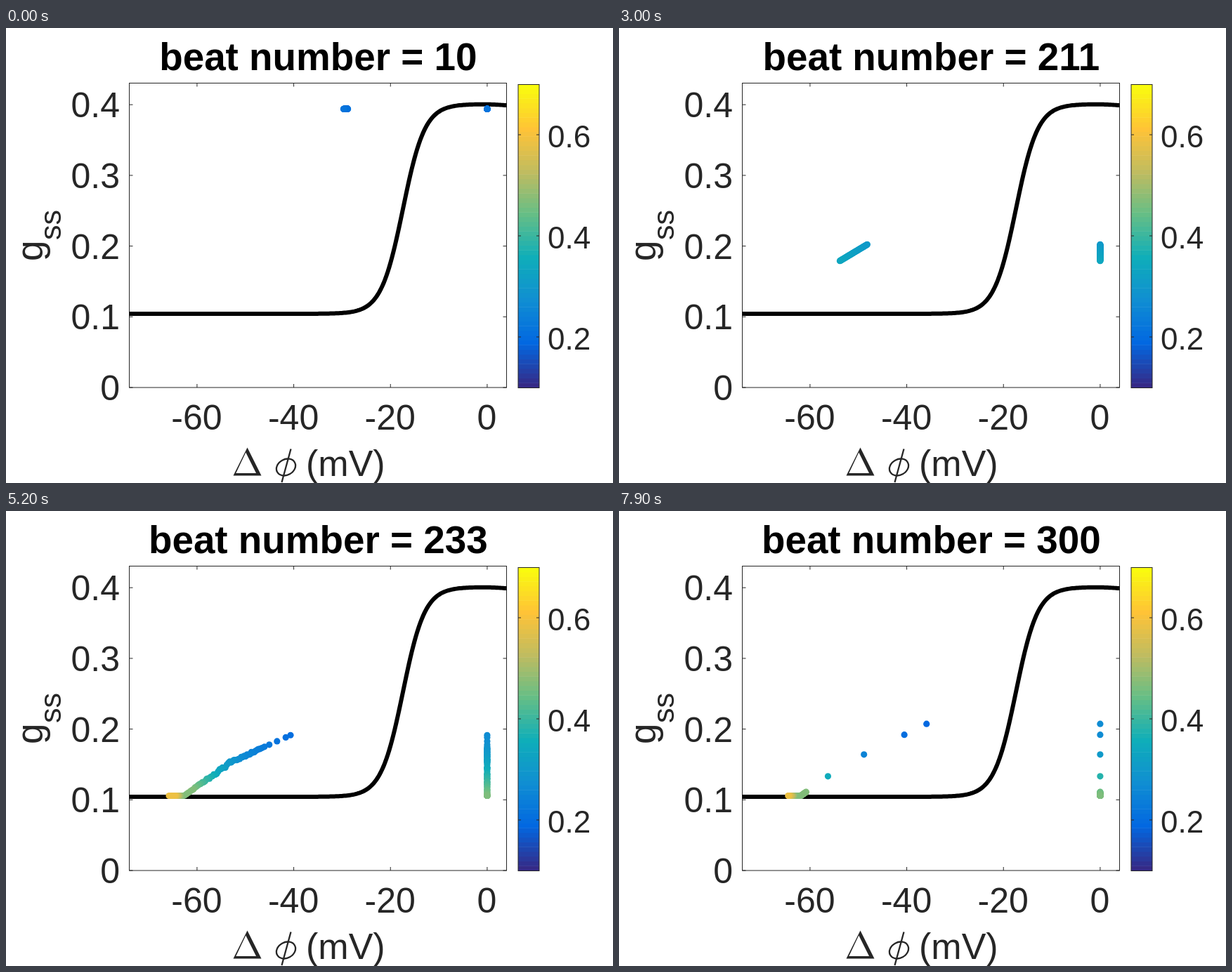
These frames come from a looping animation (864x648 px, 8 s). An HTML page with a canvas:

```html
<!DOCTYPE html>
<html lang="en">
<head>
<meta charset="utf-8">
<title>Beat number</title>
<style>
html, body { margin: 0; width: 100%; height: 100%; overflow: hidden; background: #fff; }
canvas { display: block; }
</style>
</head>
<body>
<canvas id="stage" width="864" height="648"></canvas>
<script>
const ctx = document.getElementById('stage').getContext('2d');
const LOOP = 8000, STEP = 100, CELLS = 70;
const BOX = { l: 175.5, t: 78.5, r: 712.5, b: 512 };
const BAR = { l: 729, t: 80, r: 759, b: 512 };
const INK = '#262626';
const SANS = '"Liberation Sans", Arial, sans-serif';
const MAP = ['352a87', '0268e1', '108ed2', '0faeb9', '65be86', 'c0bc60', 'ffc337', 'f9fb0e'];

const px = mv => 684.9 + mv * 6.883;
const py = g => 512 - g * 1007;
const barY = v => 512 - (v - 0.1) * 720;
const clamp = v => Math.min(1, Math.max(0, v));
const mix = (a, b, k) => a + (b - a) * k;
const noise = n => {
  const s = Math.sin(n * 12.9898) * 43758.5453;
  return s - Math.floor(s) - 0.5;
};

function shade(k) {
  const p = k * (MAP.length - 1), i = Math.min(MAP.length - 2, Math.floor(p));
  const part = c => Math.round(mix(parseInt(MAP[i].substr(c, 2), 16), parseInt(MAP[i + 1].substr(c, 2), 16), p - i));
  return `rgb(${part(0)},${part(2)},${part(4)})`;
}
const colorOf = v => shade(clamp((v - 0.1) / 0.6));

// The beat counter jumps by ten, then by one, then by five.
function beatAt(n) {
  if (n <= 19) return 10 + 10 * n;
  return n <= 69 ? 181 + n : 250 + 5 * (n - 69);
}

// Tight cluster of cells sinking together, widening as it goes.
function cluster(beat) {
  const level = py(0.4 - 0.0006 * beat - 0.049 * (beat / 190) ** 5);
  const right = 486 - 0.65 * (level - 116);
  const width = 6 + 33 * Math.exp((beat - 211) / 12);
  return { level, right, width, slope: -0.6 * beat / 211 };
}

// Cells run from right to left. The cluster fans out, then cells drift
// away from an unstable point until the left ones reach their floor.
function cellX(beat, rank, c) {
  const u = rank / (CELLS - 1);
  const fan = mix(374, 232, u) + 31 * Math.exp(-rank * rank / 6);
  if (beat < 241) return mix(c.right - c.width * u, fan, clamp((beat - 211) / 11));
  const age = beat - 241;
  const floor = 268 - (36 - 0.15 * age) * u;
  return Math.max(floor, 396 + (fan - 396) * Math.exp(0.026 * age));
}

function cellY(beat, rank, x, c) {
  const early = c.level + c.slope * (x - c.right + c.width / 2);
  const unsettled = clamp((241 - beat) / 15);
  const lx = x + 10 * unsettled * clamp((403 - x) / 60);
  const rise = Math.max(0, Math.min(0.72 * (lx - 259), 0.49 * (lx - 229)));
  const rough = 8 * unsettled * clamp((x - 255) / 40) * clamp((375 - x) / 40);
  const late = 405.5 - rise + rough * noise(rank);
  return Math.min(405.5, mix(early, late, clamp((beat - 212) / 10)));
}

const earlyV = x => 0.21 + 0.0005 * (485 - x) + 1.4e-6 * (485 - x) ** 2;
const lateV = x => Math.min(0.47, 0.17 + 0.26 * Math.exp((275 - x) / 60)) + 0.12 * clamp((250 - x) / 9);
const restV = y => 0.268 + 0.2 * (Math.max(0, y - 320) / 86) ** 1.5;

function dot(x, y, v) {
  ctx.fillStyle = colorOf(v);
  ctx.beginPath();
  ctx.arc(x, y, 4.6, 0, 7);
  ctx.fill();
}

function drawCells(beat) {
  const c = cluster(beat);
  const settled = clamp((beat - 211) / 13);
  for (let r = 0; r < CELLS; r++) {
    const x = cellX(beat, r, c), y = cellY(beat, r, x, c);
    dot(x, y, mix(earlyV(x), lateV(x), settled));
    dot(px(0), y, mix(earlyV(x), restV(y), settled));
  }
}

function text(str, x, y, size, align = 'center', weight = '') {
  ctx.font = `${weight} ${size}px ${SANS}`;
  ctx.textAlign = align;
  ctx.fillText(str, x, y);
}

function line(x0, y0, x1, y1) {
  ctx.beginPath();
  ctx.moveTo(x0, y0);
  ctx.lineTo(x1, y1);
  ctx.stroke();
}

function drawCurve() {
  ctx.save();
  ctx.beginPath();
  ctx.rect(BOX.l, BOX.t, BOX.r - BOX.l, BOX.b - BOX.t);
  ctx.clip();
  ctx.beginPath();
  for (let x = BOX.l - 4; x <= BOX.r + 4; x += 2) {
    const s = 1 / (1 + Math.exp((565 - x) / 15.6));
    const dip = 1.7 * (Math.max(0, x - 672) / 40) ** 2;
    ctx.lineTo(x, 407 - 298.6 * s + dip);
  }
  ctx.strokeStyle = '#000';
  ctx.lineWidth = 6;
  ctx.stroke();
  ctx.restore();
}

function drawAxes() {
  ctx.strokeStyle = ctx.fillStyle = INK;
  ctx.lineWidth = 1;
  ctx.strokeRect(BOX.l, BOX.t, BOX.r - BOX.l, BOX.b - BOX.t);
  for (let mv = -60; mv <= 0; mv += 20) {
    const x = px(mv);
    line(x, BOX.b, x, BOX.b - 5);
    line(x, BOX.t, x, BOX.t + 5);
    text(mv, x - 0.5, 572, 50);
  }
  for (let i = 0; i <= 4; i++) {
    const y = py(i / 10);
    line(BOX.l, y, BOX.l + 5, y);
    line(BOX.r, y, BOX.r - 5, y);
    text(i / 10, 162, y + 18, 50, 'right');
  }
}

function drawBar() {
  const h = (BAR.b - BAR.t) / 64;
  for (let i = 0; i < 64; i++) {
    ctx.fillStyle = shade(i / 63);
    ctx.fillRect(BAR.l, BAR.b - (i + 1) * h, BAR.r - BAR.l, h + 0.5);
  }
  ctx.strokeStyle = ctx.fillStyle = INK;
  ctx.lineWidth = 1;
  ctx.strokeRect(BAR.l, BAR.t + 0.5, BAR.r - BAR.l, BAR.b - BAR.t);
  for (const v of [0.2, 0.4, 0.6]) {
    const y = barY(v);
    line(BAR.r, y, BAR.r - 4, y);
    line(BAR.l, y, BAR.l + 4, y);
    text(v, 771, y + 17.5, 44, 'left');
  }
}

function triangle(x0, y0, x1, x2, y1) {
  ctx.moveTo(x0, y0);
  ctx.lineTo(x1, y1);
  ctx.lineTo(x2, y1);
  ctx.closePath();
}

function drawLabels() {
  ctx.fillStyle = ctx.strokeStyle = INK;
  text('(mV)', 427, 637.5, 52, 'left');

  // Delta
  ctx.beginPath();
  triangle(343.5, 597.5, 363.5, 323.5, 637.5);
  triangle(341.3, 604.5, 356, 327.3, 634);
  ctx.fill('evenodd');

  // phi
  ctx.lineWidth = 2.3;
  ctx.beginPath();
  ctx.ellipse(398.5, 625.5, 14.2, 11.2, -0.5, 0, 7);
  ctx.stroke();
  line(405.5, 599.5, 392.5, 647);

  ctx.save();
  ctx.translate(52, 332);
  ctx.rotate(-Math.PI / 2);
  text('g', 0, 0, 53, 'left');
  text('ss', 30, 26, 43, 'left');
  ctx.restore();
}

function draw(time) {
  const beat = beatAt(Math.floor((time % LOOP) / STEP));
  ctx.fillStyle = '#fff';
  ctx.fillRect(0, 0, 864, 648);
  drawAxes();
  drawBar();
  drawLabels();
  drawCurve();
  drawCells(beat);
  ctx.fillStyle = '#000';
  text('beat number = ' + beat, 444.3, 60, 54.8, 'center', 'bold');
}

let start = null;
function tick(now) {
  if (start === null) start = now;
  draw(now - start);
  requestAnimationFrame(tick);
}
draw(0);
requestAnimationFrame(tick);
</script>
</body>
</html>
```
